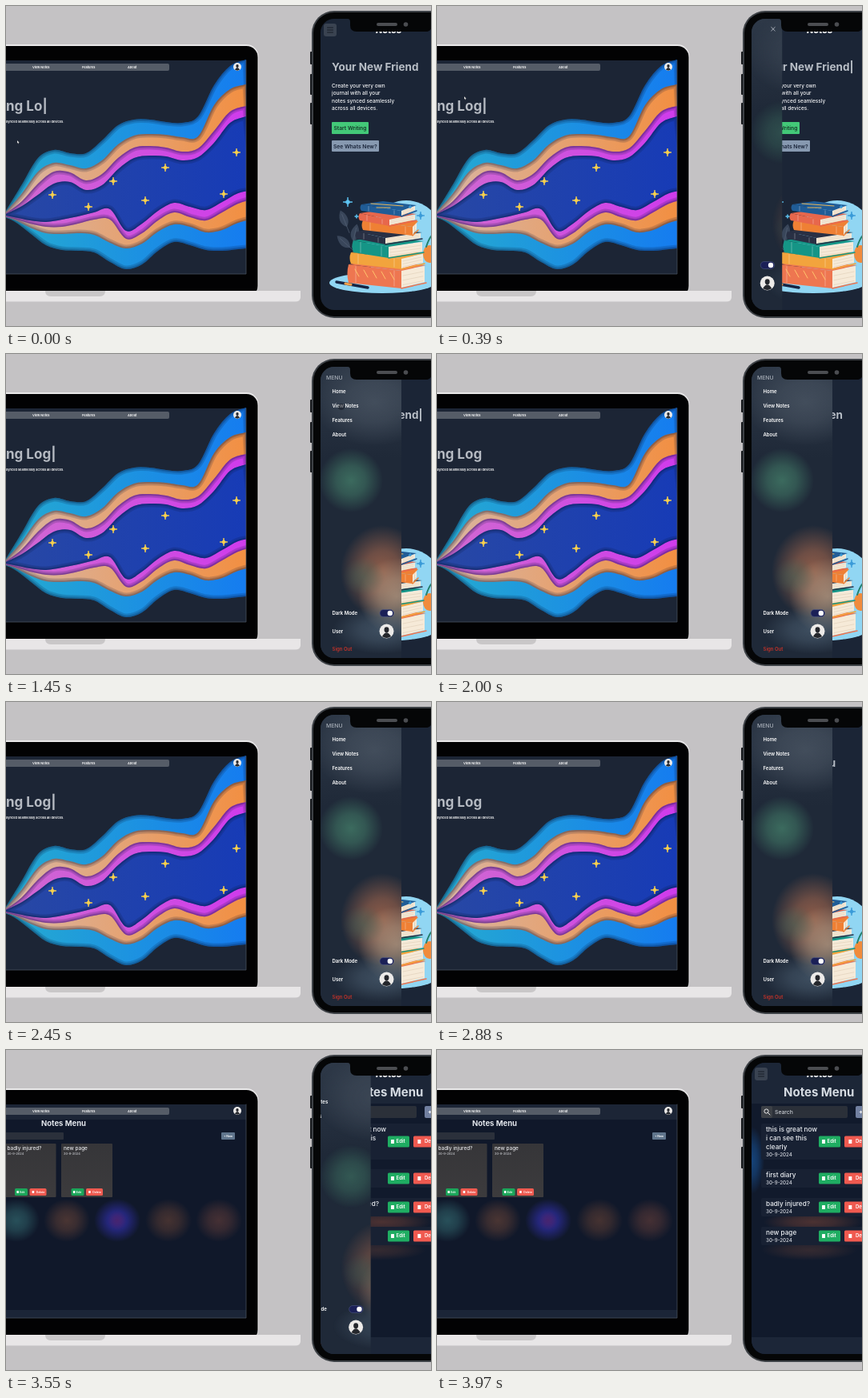
Animation, 531 px wide and 400 px high, one loop 4000 ms. Source, as an HTML page:

```html
<!DOCTYPE html>
<html lang="en">
<head>
<meta charset="utf-8">
<style>
  html, body { margin: 0; width: 100%; height: 100%; overflow: hidden; background: #c4c2c4; }
  svg { display: block; }
  text { font-family: Inter, "Open Sans", sans-serif; white-space: pre; }
</style>
</head>
<body>
<svg id="stage" width="531" height="400" viewBox="0 0 531 400"></svg>
<script>
const text = (x, y, size, str, fill = '#fff', weight = 600, extra = '') =>
  `<text x="${x}" y="${y}" font-size="${size}" fill="${fill}" font-weight="${weight}" ${extra}>${str}</text>`;
const rect = (x, y, w, h, fill, r = 0, extra = '') =>
  `<rect x="${x}" y="${y}" width="${w}" height="${h}" rx="${r}" fill="${fill}" ${extra}/>`;
const oval = (x, y, rx, ry, fill, extra = '') =>
  `<ellipse cx="${x}" cy="${y}" rx="${rx}" ry="${ry}" fill="${fill}" ${extra}/>`;
const poly = (pts, fill) => `<polygon points="${pts}" fill="${fill}"/>`;
const path = (d, fill, extra = '') => `<path d="${d}" fill="${fill}" ${extra}/>`;
const line = (d, color, w) => path(d, 'none', `stroke="${color}" stroke-width="${w}" stroke-linecap="round"`);
const star = (x, y, r, fill) =>
  path(`M${x} ${y - r}Q${x} ${y} ${x + r} ${y}Q${x} ${y} ${x} ${y + r}Q${x} ${y} ${x - r} ${y}Q${x} ${y} ${x} ${y - r}`, fill,
    `stroke="${fill}" stroke-width=".8"`);
const group = (id, body, extra = '') => `<g id="${id}" ${extra}>${body}</g>`;

let defs = '';
const linear = (id, a, b, dir = 'x2="300" y2="0"') => {
  defs += `<linearGradient id="${id}" gradientUnits="userSpaceOnUse" x1="0" y1="0" ${dir}>
    <stop stop-color="${a}"/><stop offset="1" stop-color="${b}"/></linearGradient>`;
  return `url(#${id})`;
};
let glows = 0;
const glow = (x, y, rx, ry, color, alpha = 1) => {
  const id = 'glow' + glows++;
  defs += `<radialGradient id="${id}"><stop stop-color="${color}" stop-opacity="${alpha}"/>
    <stop offset=".45" stop-color="${color}" stop-opacity="${alpha * .7}"/>
    <stop offset="1" stop-color="${color}" stop-opacity="0"/></radialGradient>`;
  return oval(x, y, rx, ry, `url(#${id})`);
};
const avatar = (x, y, r) => oval(x, y, r, r, '#eceae8') +
  oval(x, y - r * .2, r * .33, r * .38, '#25272c') +
  path(`M${x - r * .62} ${y + r * .72}Q${x} ${y - r * .35} ${x + r * .62} ${y + r * .72}Q${x} ${y + r * 1.15} ${x - r * .62} ${y + r * .72}`, '#25272c');

// Smooth line through points
function curve(pts) {
  let d = '';
  for (let i = 0; i < pts.length - 1; i++) {
    const [p, a, b, n] = [pts[i - 1] || pts[i], pts[i], pts[i + 1], pts[i + 2] || pts[i + 1]];
    d += `C${a[0] + (b[0] - p[0]) / 6} ${a[1] + (b[1] - p[1]) / 6} ${b[0] - (n[0] - a[0]) / 6} ${b[1] - (n[1] - a[1]) / 6} ${b}`;
  }
  return d;
}
// Paper layer: both edges have a point every 20 px, the lower one half a step earlier
function ribbon(id, from, to, top, bottom) {
  const up = top.map((y, i) => [i * 20, y]);
  const low = bottom.map((y, i) => [i * 20 - 10, y]).reverse();
  const d = `M${up[0]}${curve(up)}L${low[0]}${curve(low)}Z`;
  defs += `<clipPath id="${id}Edge">${path(d)}</clipPath>`;
  const shade = [9, 5, 2.5].map(w => path(d, 'none', `stroke="#0b1638" stroke-opacity=".17" stroke-width="${w}"`)).join('');
  return path(d, linear(id, from, to)) + `<g clip-path="url(#${id}Edge)">${shade}</g>`;
}
const waves =
  ribbon('sea', '#25abd0', '#157cf0',
    [256, 223, 190, 180, 184, 184, 168, 149, 142, 142, 145, 146, 138, 99, 75, 67],
    [261, 269, 284, 299, 305, 306, 308, 320, 329, 323, 306, 295, 299, 305, 306, 304, 302]) +
  ribbon('sand', '#d8b6a4', '#f28f42',
    [257, 234, 207, 196, 199, 203, 193, 173, 162, 160, 161, 164, 163, 124, 104, 98],
    [261, 267, 277, 284, 285, 284, 286, 296, 303, 297, 282, 273, 276, 283, 280, 271, 266]) +
  ribbon('pink', '#d06bd0', '#cf3bec',
    [259, 244, 222, 207, 208, 218, 210, 190, 177, 175, 177, 182, 178, 156, 132, 125],
    [261, 266, 272, 276, 276, 272, 267, 267, 291, 284, 268, 258, 264, 268, 258, 247, 241]) +
  ribbon('deep', '#2848a4', '#173bb6',
    [260, 250, 236, 222, 220, 230, 224, 204, 190, 187, 188, 193, 189, 171, 146, 138],
    [260, 264, 268, 270, 267, 263, 258, 254, 281, 272, 256, 246, 251, 255, 245, 234, 230]) +
  [[58, 236], [103, 251], [134, 219], [174, 243], [199, 202], [272, 235], [288, 183]]
    .map(([x, y]) => star(x, y, 5, '#f8d14e')).join('');

const tag = (x, y, w, h, size, color, label) => rect(x, y, w, h, color, 1.5) +
  rect(x + w * .15, y + h * .32, h * .28, h * .36, '#fff', .5) +
  text(x + w * .39, y + h * .64, size, label);

function laptop() {
  const nav = rect(-5, 72, 209, 9, '#555c67', 2) +
    text(33, 77.8, 3.9, 'View Notes') + text(95, 77.8, 3.9, 'Features') + text(152, 77.8, 3.9, 'About') + avatar(289, 76, 5);
  const home = rect(0, 68, 300, 267, '#1c2535') + waves + text(0, 131, 17, '', '#b5bac2', 700, 'id="log"') +
    text(0, 146, 3.95, 'synced seamlessly across all devices.');
  const card = (x, title) => rect(x - 3, 117, 64, 67, linear('card' + x, '#2b2c31', '#3c3b3d', 'x2="0" y2="184"'), 1) +
    text(x, 125, 6.4, title, '#e4e5e8', 500) + text(x, 131, 3.9, '30-9-2024', '#c9cbd0', 500) +
    tag(x + 9.5, 173, 16, 9, 3.4, '#1ca65a', 'Edit') + tag(x + 28, 173, 21, 9, 3.4, '#ee5a50', 'Delete');
  const notes = rect(0, 68, 300, 267, '#10182a') + rect(0, 68, 300, 19, '#1c2536') + rect(0, 325, 300, 10, '#1b2537') +
    text(44, 95, 9.5, 'Notes Menu', '#e2e6ec', 700) + rect(-5, 103, 77, 9, '#2b303b', 1) +
    rect(269, 103, 17, 9, '#60758c', 1) + text(272, 109, 3.6, '+ New') + card(1.5, 'badly injured?') + card(72, 'new page') +
    [[13, '#28505a'], [76, '#4a3533'], [139, '#2c2c98'], [203, '#453231'], [266, '#453034']]
      .map(([x, c]) => glow(x, 213, 29, 27, c)).join('') + glow(139, 213, 12, 12, '#47246e');
  return rect(-40, 48, 355.5, 316, '#e9e8e9', 15) + rect(-40, 50, 354.5, 314, '#020203', 14) +
    `<svg width="300" height="335">${group('home', home)}${group('notes', notes)}${nav}
      ${path('M0 0V6L1.5 4.8L2.5 7L3.5 6.5L2.5 4.5H4.5Z', '#fff', 'id="mouse" stroke="#333" stroke-width=".4"')}</svg>` +
    line('M0 335H300V68', '#4e5763', .7) + path('M0 356H368V364Q368 369.500 361 369.500H0Z', '#e8e6e7') +
    path('M49 356H124Q124 363 117 363H56Q49 363 49 356', '#c9c7c8');
}

const book = (x, y, w, h, spine, right = 520) =>
  poly(`${x + w},${y + 7} ${right},${y + 2} ${right},${y + h - 1} ${x + w},${y + h + 6}`, '#f6ead8') +
  [.35, .6, .85].map(k => line(`M${x + w + 2} ${y + 6 + h * k}L${right - 2} ${y + 1 + h * k}`, '#d9c7ae', .5)).join('') +
  poly(`${x},${y} ${x + 27},${y - 4} ${right + 2},${y + 1} ${x + w},${y + 8}`, spine) +
  path(`M${x} ${y}L${x + w} ${y + 8}V${y + h + 7}L${x} ${y + h}Q${x - 3} ${y + h / 2} ${x} ${y}`, spine) +
  line(`M${x + w} ${y + h + 7}L${right + 2} ${y + h}`, spine, 1.5) +
  line(`M${x + 9} ${y + 2.5}V${y + h}M${x + w - 9} ${y + 8}V${y + h + 4}`, '#fff3', 1.5);
const leaf = (x, y, a) => `<g transform="translate(${x} ${y}) rotate(${a})">${path('M0 0C-8 -6 -6 -15 0 -22C6 -15 7 -6 0 0', '#39465a')}${line('M0 8V-17', '#566378', .6)}</g>`;
const books = oval(500, 300, 50, 57, '#91d6f3') + oval(470, 346, 66, 13, '#91d6f3') +
  leaf(426, 276, -22) + leaf(430, 302, -48) + leaf(434, 294, 12) +
  oval(529, 310, 8, 11, '#f08b3c') + line('M525 301Q529 289 533 286', '#22806d', 2) +
  book(428, 323, 66, 23, '#ee7650', 523) + book(431, 308, 63, 14, '#f2a43d', 521) + book(434, 293, 44, 15, '#159586', 520) +
  book(438, 282, 36, 9, '#293044', 518) + book(446, 268, 62, 12, '#ef8034', 513) + book(442, 259, 37, 9, '#e7674c', 511) +
  book(444, 248, 50, 8, '#205c96', 511) +
  line('M456 247L496 250M463 252H480', '#e8b65a', 1) +
  [436, 447, 458, 469, 480].map((x, i) => line(`M${x} ${329 + i}l5 9`, '#ffc36b', 1)).join('') +
  line('M413 345L452 352', '#172443', 3.5) + line('M424 347L431 348.200', '#f3a14b', 3) +
  star(427, 245, 6, '#5ec5f3') + star(438, 263, 2.5, '#5ec5f3') + star(518, 262, 5, '#3a9bd8') + star(505, 251, 2, '#3a9bd8');

function phone() {
  const menuButton = rect(397, 22, 16, 16, '#3a4351', 3) + line('M401.500 27H408.500M401.500 30H408.500M401.500 33H408.500', '#161c27', 1);
  const logo = text(462, 34, 11, 'Notes', '#fff', 800, 'font-style="italic"');
  const intro = ['Create your very own', 'journal with all your', 'notes synced seamlessly', 'across all devices.']
    .map((s, i) => text(407, 102 + i * 9.4, 6.5, s, '#f3f4f6', 500)).join('');
  const home = rect(393, 16, 190, 364, '#1b2536') + text(407, 81, 13.5, '', '#b8bec6', 700, 'id="word"') + intro +
    rect(407, 145, 46, 15, '#43c878', 1) + text(409.5, 155, 6.7, 'Start Writing', '#15382a') +
    rect(407, 168, 59, 14, '#8799b0', 1) + text(409, 177.5, 6.7, 'See Whats New?', '#182338') + books;

  const row = (y, h, lines) => {
    const mid = y + h / 2;
    return rect(405, y, 140, h, '#182133', 2) +
      lines.map((s, i) => text(411, y + 9.5 + i * 11, 8.2, s, '#edf0f4', 500)).join('') +
      text(411, y + h - 4, 6.2, '30-9-2024', '#d5d9e0', 500) +
      tag(477, mid - 7, 27, 14, 6, '#1fad62', 'Edit') + tag(509, mid - 7, 36, 14, 6, '#f05a50', 'Delete');
  };
  const notes = rect(393, 16, 190, 364, '#111a2c') + rect(393, 16, 190, 51, '#1c2637') + rect(393, 359, 190, 21, '#1c2638') +
    glow(394, 138, 15, 42, '#17549a', .7) + glow(470, 215, 62, 14, '#653c35', .7) + glow(465, 250, 60, 13, '#513735', .55) +
    text(433, 58, 15, 'Notes Menu', '#d5dbe2', 700) + rect(405, 70, 108, 15, '#2b3039', 2) + rect(405, 70, 14, 15, '#3c4046', 2) +
    oval(411.5, 76.5, 2.6, 2.6, 'none', 'stroke="#eee"') + line('M413.500 78.500L416 81', '#eee', 1) +
    text(422, 80, 6.8, 'Search', '#c8ccd2', 500) + rect(523, 70, 20, 15, '#7180a0', 2) + text(527, 80, 8, '+') +
    row(92, 45, ['this is great now', 'i can see this', 'clearly']) + row(149, 23, ['first diary']) +
    row(185, 23, ['badly injured?']) + row(221, 23, ['new page']);

  const items = text(400, 31.5, 6.8, 'MENU', '#a8afb8', 500) + line('M480.500 26.500L485 31M485 26.500L480.500 31', '#aab0ba', 1) +
    ['Home', 'View Notes', 'Features', 'About'].map((s, i) => text(407.5, 49.2 + i * 18, 6, s)).join('') +
    text(407.5, 326, 6, 'Dark Mode') + rect(467, 319.5, 17.5, 9, '#1b2057', 4.5, 'stroke="#55608c" stroke-width=".5"') +
    oval(479.8, 324, 3.2, 3.2, '#fff') + text(407.5, 349, 6, 'User') + avatar(475.5, 346.5, 9) +
    text(407.5, 371.2, 6, 'Sign Out', '#c23229');
  const blur = glow(460, 60, 75, 55, '#4b5664', .75) + glow(431, 158, 40, 40, '#3d6e60', .95) +
    glow(470, 272, 52, 58, '#a2664d', .85) + glow(488, 303, 48, 48, '#baa188', .7) +
    glow(447, 278, 26, 24, '#3c6d60', .4) + glow(470, 345, 62, 30, '#5d7488', .5);
  const drawer = rect(393, 16, 101, 364, linear('glass', '#303b4a', '#1f2938', 'x2="0" y2="130"')) +
    group('blur', blur) + group('items', items);

  return [[57, 16], [85, 26], [121, 27]].map(([y, h]) => rect(380, y, 5, h, '#17191d', 1)).join('') +
    rect(382, 6, 203, 384, '#3d4146', 28) + rect(384, 8, 199, 380, '#050607', 26) +
    `<g clip-path="url(#glassEdge)">${group('phoneHome', home)}${group('phoneNotes', notes)}${menuButton}${logo}
      <svg id="drawer" x="393" y="16" width="0" height="364">${drawer}</svg>
      ${oval(0, 0, 4, 4, '#10151f', 'id="touch" opacity=".5"')}</g>` +
    path('M427 16Q430 16 430 20V24Q430 32 438 32H524Q532 32 532 24V16Z', '#050607') +
    rect(463, 21, 26, 4, '#4b4d51', 2) + oval(499.500, 23, 2.8, 2.8, '#4b4d51');
}

const art = laptop() + phone();
const stage = document.getElementById('stage');
stage.innerHTML = `<defs>${defs}<clipPath id="glassEdge">${rect(393, 16, 181, 364, '#000', 17)}</clipPath></defs>${art}`;

const el = id => document.getElementById(id);
const show = (id, on) => el(id).setAttribute('display', on ? 'inline' : 'none');
const part = (t, a, b) => Math.min(1, Math.max(0, (t - a) / (b - a)));
const ease = (t, a, b) => part(t, a, b) ** 2 * (3 - 2 * part(t, a, b));
const easeOut = (t, a, b) => 1 - (1 - part(t, a, b)) ** 2;
// Position along [time, x, y] stops
function along(stops, t) {
  let [, x, y] = stops[0];
  for (let i = 1; i < stops.length; i++) {
    const k = ease(t, stops[i - 1][0], stops[i][0]);
    x += (stops[i][1] - stops[i - 1][1]) * k;
    y += (stops[i][2] - stops[i - 1][2]) * k;
  }
  return `translate(${x} ${y})`;
}
const mousePath = [[0, 14, 168], [390, 34, 113], [910, 41, 84], [1250, 43, 76]];
const touchPath = [[0, 406, 33], [950, 406, 33], [1400, 419, 66]];

function typed(t) {
  const left = Math.max(0, 6 - Math.max(0, Math.floor((t - 1900) / 65)));
  const word = t < 2450 ? 'Friend'.slice(0, left) : 'Journal'.slice(0, Math.floor((t - 2450) / 135));
  return 'Your New ' + word;
}

function draw(t) {
  const caret = (t + 750) % 1000 < 500 ? '|' : '';
  const laptopNotes = t >= 2900, phoneNotes = t >= 3500;
  show('home', !laptopNotes);
  show('notes', laptopNotes);
  show('phoneHome', !phoneNotes);
  show('phoneNotes', phoneNotes);
  el('log').textContent = t < 100 ? 'ng Lo|' : 'ng Log' + (t < 250 ? '|' : caret);
  el('word').textContent = typed(t) + caret;

  const open = easeOut(t, 292, 760) - easeOut(t, 3500, 3740);
  el('drawer').setAttribute('width', 101 * open);
  el('drawer').setAttribute('viewBox', `393 16 ${Math.max(101 * open, .01)} 364`);
  el('items').setAttribute('transform', `translate(${101 * (open - 1)} 0)`);
  el('blur').setAttribute('opacity', .3 + .7 * open);

  show('mouse', t < 1250);
  el('mouse').setAttribute('transform', along(mousePath, t) + ' scale(.6)');
  show('touch', t >= 600 && t < 1900);
  el('touch').setAttribute('transform', along(touchPath, t));
}
function tick() {
  draw(performance.now() % 4000);
  requestAnimationFrame(tick);
}
tick();
</script>
</body>
</html>
```
